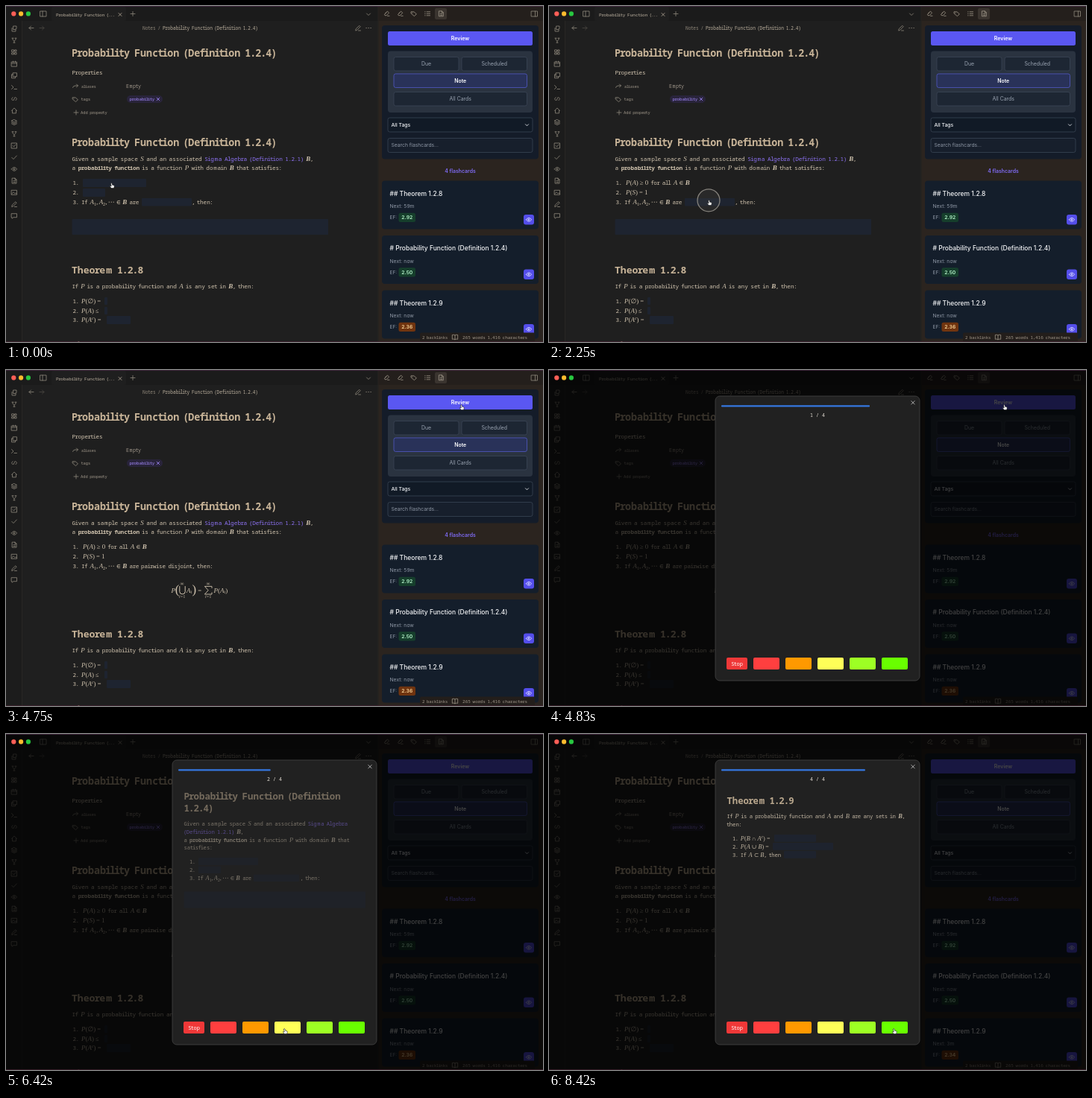
An HTML page that plays this animation: 720 by 451 pixels, repeating every 8500 ms.

```html
<!DOCTYPE html>
<html lang="en">
<head>
<meta charset="utf-8">
<title>Flashcard review</title>
<style>
html, body { margin: 0; width: 100%; height: 100%; overflow: hidden; background: #1f1f1f; }
svg { display: block; width: 720px; height: 451px; }
text { white-space: pre; }
.mono { font-family: "Noto Sans Mono", "DejaVu Sans Mono", monospace; }
.ui { font-family: Inter, Roboto, sans-serif; }
.math { font-family: "Liberation Serif", "DejaVu Serif", serif; }
</style>
</head>
<body>
<svg id="stage" viewBox="0 0 720 451"></svg>
<script>
const LOOP = 8500;
const TAN = '#c9b599', BODY = '#d0c3ae', MUTED = '#8d8578', LINK = '#8d72f2', HIDDEN = '#1e2430';
const stage = document.getElementById('stage');
const ruler = document.createElement('canvas').getContext('2d');
let layer = stage;

function add(tag, attrs, content) {
  const node = document.createElementNS('http://www.w3.org/2000/svg', tag);
  for (const key in attrs) node.setAttribute(key, attrs[key]);
  if (content !== undefined) node.textContent = content;
  layer.append(node);
  return node;
}
function group(draw, attrs = {}) {
  const parent = layer, g = add('g', attrs);
  layer = g;
  draw();
  layer = parent;
  return g;
}
const rect = (x, y, x2, y2, fill, rx = 0, stroke = 'none') =>
  add('rect', { x, y, width: x2 - x, height: y2 - y, fill, rx, stroke, 'stroke-width': .8 });
const path = (d, stroke, width = .8, attrs = {}) =>
  add('path', { d, stroke, 'stroke-width': width, fill: 'none', 'stroke-linecap': 'round', 'stroke-linejoin': 'round', ...attrs });
const icon = (cx, cy, d, stroke = '#8f887c', width = .8) =>
  path(d, stroke, width, { transform: `translate(${cx - 4} ${cy - 4})` });
const ui = (x, y, size, str, fill = '#fff', weight = 400, anchor = 'start') =>
  add('text', { class: 'ui', x, y, 'font-size': size, fill, 'font-weight': weight, 'text-anchor': anchor }, str);

// Duospaced setting: thin letters take a narrower cell, "m" a wider one.
const advance = c => /[ijlrtf.,:() ]/.test(c) ? .45 : c === 'm' ? .75 : .6;
function mono(x, y, size, str, fill = BODY, weight = 400) {
  const xs = [];
  for (const c of str) {
    const a = advance(c);
    xs.push((x + (a - .6) / 2 * size).toFixed(2));
    x += a * size;
  }
  add('text', { class: 'mono', x: xs.join(' '), y, 'font-size': size, fill, 'font-weight': weight }, str);
  return x;
}

function glyph(x, y, size, c, weight = 400) {
  const style = /[A-Za-z]/.test(c) ? 'italic' : 'normal';
  add('text', { class: 'math', x, y, 'font-size': size, 'font-style': style, 'font-weight': weight, fill: BODY }, c);
  ruler.font = `${style} ${weight} ${size}px "Liberation Serif", "DejaVu Serif", serif`;
  return x + ruler.measureText(c).width;
}
function math(x, y, size, str) {
  const em = size * 1.16;
  for (let i = 0; i < str.length; i++) {
    const c = str[i];
    if (c === '_') x = glyph(x, y + em * .16, em * .68, str[++i]);
    else if (c === '^') x = glyph(x, y - em * .36, em * .68, str[++i]);
    else if ('≥≤=∈∩∪⊂'.includes(c)) x = glyph(x + em * .24, y, em * .95, c) + em * .24;
    else if (c === 'ℬ') x = glyph(x, y, em, 'B', 700);
    else x = glyph(x, y, em, c) + (c === ',' ? em * .15 : 0);
  }
  return x;
}
// $math$, *bold*, [link]
function line(x, y, size, str) {
  for (const run of str.split(/(\$[^$]+\$|\*[^*]+\*|\[[^\]]+\])/)) {
    const inner = run.slice(1, -1);
    if (run[0] === '$') x = math(x, y, size, inner);
    else if (run[0] === '*') x = mono(x, y, size, inner, BODY, 700);
    else if (run[0] === '[') x = mono(x, y, size, inner, LINK);
    else if (run) x = mono(x, y, size, run);
  }
  return x;
}
const title = (x, y, size, str) => mono(x, y, size, str, TAN, 600);
const hiddenBox = (x, y, x2, y2) => rect(x, y, x2, y2, HIDDEN, 1);

const FILE = 'M1.5 .5H5L7 2.5V7.5H1.5ZM5 .5V2.5H7';
const FORK = 'M2 1V3L4 5L6 3V1M4 5V7M1 1H3M5 1H7M3 7H5';
const RIBBON = [
  'M1 3V7.5H6V5M3 .5H7V4L5 5H3Z', FORK, 'M1 1H3.5V3.5H1ZM5 1H7V3H5ZM5 4.5H7V7H5ZM1 5H3.5V7H1Z',
  'M.5 1.5H7.5V7.5H.5ZM.5 3.5H7.5M2.5 .5V2M5.5 .5V2', 'M2.5 .5H7.5V5.5H2.5ZM2.5 2.5H.5V7.5H5.5V5.5',
  'M.5 1.5L3 4L.5 6.5M4 6.5H7.5', 'M2 2L.5 4L2 6M3 6L5 2M6 2L7.5 4L6 6',
  'M.5 4L4 .5L7.5 4M1.5 3.5V7.5H6.5V3.5', 'M4 .5L7.5 2.2L4 4L.5 2.2ZM.5 4L4 5.8L7.5 4M.5 5.8L4 7.5L7.5 5.8',
  FORK, 'M.5 .5H7.5V7.5H.5ZM2.2 4L3.5 5.4L6 2.5', 'M.8 4.2L3 6.4L7.3 1.8',
  'M.3 4Q4 -1 7.7 4Q4 9 .3 4M3 4A1 1 0 1 0 5 4A1 1 0 1 0 3 4', FILE + 'M3 4H5.5M3 6H5.5',
  'M.5 1H7.5V7H.5ZM.5 6L3 3.5L5 5.5L6 4.5L7.5 6', 'M.8 7.2L1.3 5L5.8 .8L7.2 2.2L2.8 6.7ZM4.5 7.5H7.5',
  'M.5 1H7.5V6H3L1 7.5V6H.5Z'
];
const CLIP = 'M2 3.5L5 .8L7 3L3.5 6.5L1.5 6.3L.8 5L3.5 2.5M5 7H7.5';
const TAG = 'M.5 1.5H4L7.5 4.5L4.5 7.3L.5 4ZM2 2.8V3';

function drawChrome() {
  rect(0, 0, 720, 451, '#1f1f1f');
  rect(0, 0, 499, 20, '#1b1b1b');
  rect(61, 1, 161, 20, '#1f1f1f', 3);
  rect(0, 20, 22, 451, '#1c1c1c');
  path('M21.5 20V451M499 0V451', '#2c2a28');
  RIBBON.forEach((d, i) => icon(11, 30.5 + i * 15.7, d));
  icon(50, 10.5, 'M0 .5H8V7.5H0ZM3 .5V7.5');
  mono(67, 13.6, 6.05, 'Probability Function (...', '#bdb2a0');
  icon(153, 11.5, 'M2 2L6 6M6 2L2 6', '#b5aa99');
  icon(170, 10.5, 'M1 4H7M4 1V7');
  icon(486, 11, 'M1.5 3L4 5.5L6.5 3');
  icon(34, 29.5, 'M7 4H1M3.5 1.5L1 4L3.5 6.5');
  icon(48, 29.5, 'M1 4H7M4.5 1.5L7 4L4.5 6.5', '#4c4843');
  mono(mono(183, 32, 6.2, 'Notes / ', MUTED), 32, 6.2, 'Probability Function (Definition 1.2.4)', '#b9ae9c');
  icon(472, 29.5, RIBBON[15]);
  icon(486, 29.5, 'M1 4H1.2M4 4H4.2M7 4H7.2', '#9a9285', 1.2);
}

function drawNote() {
  title(88, 68.3, 13.35, 'Probability Function (Definition 1.2.4)');
  mono(88.5, 92.2, 7.6, 'Properties');
  icon(93, 108, 'M.5 5.5Q1 3 4 3H7.5M5.5 1L7.5 3L5.5 5');
  mono(101, 110, 5.1, 'aliases', '#a0978a');
  mono(161, 110.2, 6.7, 'Empty', '#a0978a');
  icon(93, 125.3, TAG);
  mono(101, 127.2, 5.4, 'tags', '#a0978a');
  rect(162, 120, 210, 130, '#29243b', 5);
  mono(165.5, 127.3, 5.75, 'probability', '#a58bff');
  icon(204, 125, 'M2.2 2.2L5.8 5.8M5.8 2.2L2.2 5.8', '#a58bff');
  icon(94, 143, 'M1 4H7M4 1V7');
  mono(100, 145.2, 5.4, 'Add property', '#a0978a');

  title(88, 188.3, 13.35, 'Probability Function (Definition 1.2.4)');
  line(88.5, 208, 7.75, 'Given a sample space $S$ and an associated [Sigma Algebra (Definition 1.2.1)] $ℬ$,');
  line(88.5, 219.7, 7.75, 'a *probability function* is a function $P$ with domain $ℬ$ that satisfies:');
  ['1.', '2.', '3. If $A_1,A_2,⋯∈ℬ$ are'].forEach((s, i) => line(89.5, 240.3 + i * 12.9, 7.7, s));
  mono(249.5, 266.1, 7.7, ', then:');

  title(88, 358.7, 13.1, 'Theorem 1.2.8');
  line(88.5, 378.5, 7.75, 'If $P$ is a probability function and $A$ is any set in $ℬ$, then:');
  ['1. $P(∅)=$', '2. $P(A)≤$', '3. $P(A^c)=$'].forEach((s, i) => line(89.5, 398.6 + i * 12.9, 7.7, s));
  hiddenBox(132, 391, 136, 401);
  hiddenBox(132, 404, 136, 414);
  hiddenBox(135, 416, 167, 427);
  title(88, 459.5, 13.1, 'Theorem 1.2.9');
}

function drawUnion() {
  math(221.5, 298.5, 7.75, 'P');
  glyph(226.8, 300, 17, '(');
  path('M232.8 290.5V297.5Q232.8 300.8 236.5 300.8Q240.2 300.8 240.2 297.5V290.5', BODY, 1);
  math(242, 298.5, 7.75, 'A_i');
  glyph(249.5, 300, 17, ')');
  math(255, 298.5, 7.75, '=');
  path('M276 292.6V290.4H266.4L271.2 295.7L266.4 301H276V298.8', BODY, .9);
  math(278.5, 298.5, 7.75, 'P(A_i)');
  for (const x of [232, 267]) {
    glyph(x + 1.5, 289, 7, '∞');
    math(x, 306.3, 5, 'i');
    glyph(x + 2, 306.3, 5.5, '=');
    glyph(x + 5.5, 306.3, 5.5, '1');
  }
}

function eye(cx, cy) {
  rect(cx - 7, cy - 6.7, cx + 7, cy + 6.7, '#544eea', 3);
  icon(cx, cy, RIBBON[12], '#e6e6ff', .8);
}

let lastNext, lastScore;
function drawPanel() {
  rect(499.5, 0, 720, 451, '#2b241f');
  rect(499.5, 0, 720, 20, '#241f1c');
  rect(575, 3, 591, 18, '#3a342f', 2);
  [CLIP, CLIP, TAG, 'M.5 1.5H1M.5 4H1M.5 6.5H1M3 1.5H7.5M3 4H7.5M3 6.5H7.5', RIBBON[13]]
    .forEach((d, i) => icon(510.5 + i * 18.2, 10.3, d, '#a0978a'));
  icon(708.5, 10.5, 'M0 .5H8V7.5H0ZM5 .5V7.5');
  rect(504, 26, 714, 205.5, '#141c29', 4);
  rect(512, 34, 706, 53, '#5a57f2', 2.5);
  ui(609, 46.1, 7, 'Review', '#fff', 600, 'middle');
  rect(512, 60.5, 706, 143, '#2a3340', 4);
  const option = (x, y, x2, label, on) => {
    rect(x, y, x2, y + 18.5, on ? '#293259' : '#1d2633', 2.5, on ? '#5158c4' : '#3b4656');
    ui((x + x2) / 2, y + 11.8, 6.9, label, on ? '#fff' : '#9aa4b2', on ? 600 : 400, 'middle');
  };
  option(520, 68.5, 607, 'Due');
  option(611, 68.5, 698.5, 'Scheduled');
  option(520, 91, 698.5, 'Note', true);
  option(520, 115.5, 698.5, 'All Cards');
  rect(512, 150, 706, 169, '#111a26', 2.5, '#394453');
  ui(516.5, 162.2, 6.8, 'All Tags', '#f1f3f6', 500);
  icon(698.5, 159.8, 'M2 3L4 5L6 3', '#e5e7eb', .9);
  rect(512, 177.5, 706, 196.5, '#171f2c', 2.5, '#394453');
  ui(516.5, 189.4, 6.75, 'Search flashcards...', '#8f98a6');
  ui(609, 223.8, 6.9, '4 flashcards', '#7f6bf5', 600, 'middle');
  [['## Theorem 1.2.8', '59m', '2.92'], ['# Probability Function (Definition 1.2.4)', 'now', '2.50'], ['## Theorem 1.2.9', 'now', '2.36']]
    .forEach(([heading, next, score], i) => {
      const y = 234.5 + i * 73.5, low = i === 2;
      rect(504, y, 714, y + 65, '#141e2b', 4);
      ui(514.5, y + 20, 8.5, heading, '#f3f4f6', 500);
      lastNext = ui(514.5, y + 36.8, 6.8, 'Next: ' + next, '#8f98a6');
      ui(514.5, y + 51.8, 6.6, 'EF:', '#8f98a6');
      rect(526.5, y + 43.3, 549, y + 55.5, low ? '#70340f' : '#163f2c', 2.5);
      lastScore = ui(537.8, y + 51.9, 6.8, score, low ? '#fbd79b' : '#b5f3ca', 600, 'middle');
      eye(701, y + 52.3);
    });
  rect(555, 438.5, 709, 451, '#231e1b', 2);
  mono(558, 446.8, 5.6, '2 backlinks', '#a0978a');
  icon(602, 444.5, 'M4 1.5V7.2Q2 6 .3 6.8V1Q2.5 .3 4 1.5Q5.5 .3 7.7 1V6.8Q6 6 4 7.2', '#a0978a');
  mono(612, 446.8, 6.05, '265 words 1,416 characters', '#a0978a');
}

// Review cards
const LEFT = 238.5;
function functionCard() {
  title(LEFT, 87.7, 12.4, 'Probability Function (Definition');
  title(LEFT, 103.7, 12.4, '1.2.4)');
  line(LEFT, 122.6, 7.25, 'Given a sample space $S$ and an associated [Sigma Algebra]');
  line(LEFT, 133.6, 7.25, '[(Definition 1.2.1)] $ℬ$,');
  line(LEFT, 144.6, 7.25, 'a *probability function* is a function $P$ with domain $ℬ$ that');
  line(LEFT, 155.4, 7.25, 'satisfies:');
  ['1.', '2.', '3. If $A_1,A_2,⋯∈ℬ$ are'].forEach((s, i) => line(246, 174.3 + i * 11, 7.2, s));
  mono(395, 196.3, 7.2, ', then:');
  hiddenBox(258, 166, 338, 176);
  hiddenBox(258, 177.5, 288, 187);
  hiddenBox(332, 188.5, 393, 198);
  hiddenBox(LEFT, 211.5, 482, 233.5);
}
function theoremCard(number, subject, items, boxes) {
  title(LEFT, 94.3, 12.25, 'Theorem ' + number);
  line(LEFT, 113.4, 7.25, `If $P$ is a probability function and ${subject} in $ℬ$,`);
  line(LEFT, 124.4, 7.25, 'then:');
  items.forEach((s, i) => {
    line(246, 143.2 + i * 11, 7.2, `${i + 1}. ${s}`);
    hiddenBox(boxes[i][0], 135 + i * 11, boxes[i][1], 144.8 + i * 11);
  });
}

let bar, counter, cards;
function drawModal() {
  rect(0, 0, 720, 451, 'rgba(0,0,0,.73)');
  rect(223, 35, 497, 417, '#212121', 6, '#454545');
  bar = rect(231, 47.3, 490, 49.5, '#3577e0', 1);
  icon(488, 43.8, 'M1.8 1.8L6.2 6.2M6.2 1.8L1.8 6.2', '#c8c8c8');
  counter = add('text', { class: 'mono', x: 360, y: 63, 'font-size': 6.6, fill: '#e4ded4', 'text-anchor': 'middle' });
  cards = [
    functionCard,
    () => theoremCard('1.2.8', '$A$ is any set', ['$P(∅)=$', '$P(A)≤$', '$P(A^c)=$'], [[286, 290], [286, 290], [289, 319]]),
    () => theoremCard('1.2.9', '$A$ and $B$ are any sets', ['$P(B∩A^c)=$', '$P(A∪B)=$', 'If $A⊂B$, then'], [[302, 358], [300, 381], [315, 358]])
  ].map(draw => group(draw));
  rect(238, 386, 266, 402, '#ef3838', 2);
  ['#ff3f3f', '#ff9900', '#ffff58', '#9dff24', '#69ff00']
    .forEach((fill, i) => rect(274 + i * 43, 386, 309 + i * 43, 402, fill, 2));
  mono(244.2, 396.7, 7, 'Stop', '#fff', 500);
}

drawChrome();
drawNote();
const answers = [
  [() => hiddenBox(103, 232, 188, 243), () => line(103, 240.3, 7.7, '$P(A)≥0$ for all $A∈ℬ$')],
  [() => hiddenBox(103, 245, 133, 256), () => line(103, 253.2, 7.7, '$P(S)=1$')],
  [() => hiddenBox(182, 258, 249, 268.5), () => mono(181, 266.1, 7.6, 'pairwise disjoint')],
  [() => hiddenBox(88.5, 286, 432, 307), drawUnion]
].map(pair => pair.map(draw => group(draw)));
drawPanel();
const modal = group(drawModal);
['#ff5f57', '#febc2e', '#28c840'].forEach((fill, i) => add('circle', { cx: 10.3 + i * 9.8, cy: 10.4, r: 3.1, fill }));
path('M0 .4H720', '#4d2c49');
path('M0 450.7H720', '#4a2536');
const ring = add('circle', { r: 15, fill: 'rgba(70,70,70,.25)', stroke: '#86837d', 'stroke-width': 1.3 });
const cursor = path('M-1.4 -3.2Q-.5 -4 0 -3L.6 -.8Q2.4 -.9 3.2 .2Q3.4 2 2.5 3.6H-.8Q-1.7 2.2 -2.9 .9Q-2.5 0 -1 .8Z', '#111', .6, { fill: '#fff' });

// time, x, y
const TRACK = [
  [0, 142, 241], [500, 142, 241], [1050, 119, 253], [1600, 119, 253], [2200, 215, 264], [2500, 215, 264],
  [3050, 256.5, 301.5], [3500, 256.5, 301.5], [4450, 611, 50], [4950, 611, 50], [5900, 374, 399],
  [6600, 374, 399], [7000, 420, 399], [7450, 420, 399], [8000, 463, 399], [LOOP, 463, 399]
];
const REVEALS = [450, 1500, 2450, 3400], OPEN = 4825;
const TURNS = [4773, 6250, 7400, 8356], ENTERS = [4900, 6600, 7750];
const CLICKS = [...REVEALS, OPEN, ...TURNS.slice(1)];
const smooth = v => { v = Math.min(1, Math.max(0, v)); return v * v * (3 - 2 * v); };
const show = (node, on) => { node.style.display = on ? '' : 'none'; };

function render(t) {
  const i = TRACK.findIndex((p, k) => k && t <= p[0]);
  const [a, b] = [TRACK[i - 1], TRACK[i]];
  const k = smooth((t - a[0]) / (b[0] - a[0]));
  const x = a[1] + (b[1] - a[1]) * k, y = a[2] + (b[2] - a[2]) * k;
  cursor.setAttribute('transform', `translate(${x} ${y})`);
  ring.setAttribute('transform', `translate(${x - 1} ${y - 3.2})`);
  show(ring, CLICKS.some(c => t > c - 230 && t < c - 90));

  answers.forEach(([box, text], n) => {
    show(box, t < REVEALS[n]);
    show(text, t >= REVEALS[n]);
  });

  show(modal, t >= OPEN);
  const turn = Math.max(0, TURNS.filter(c => c <= t).length - 1);
  bar.setAttribute('width', 259 * (.12 + .88 * Math.exp(-Math.max(0, t - TURNS[turn]) / 190)));
  counter.textContent = `${turn + 1} / 4`;
  cards.forEach((card, n) => {
    card.style.opacity = smooth((t - ENTERS[n]) / 200) * (1 - smooth((t - TURNS[n + 1]) / 340));
  });
  const graded = t >= 8330;
  lastNext.textContent = graded ? 'Next: 3m' : 'Next: now';
  lastScore.textContent = graded ? '2.34' : '2.36';
}

const start = performance.now();
function tick() {
  render((performance.now() - start) % LOOP);
  requestAnimationFrame(tick);
}
tick();
</script>
</body>
</html>
```
